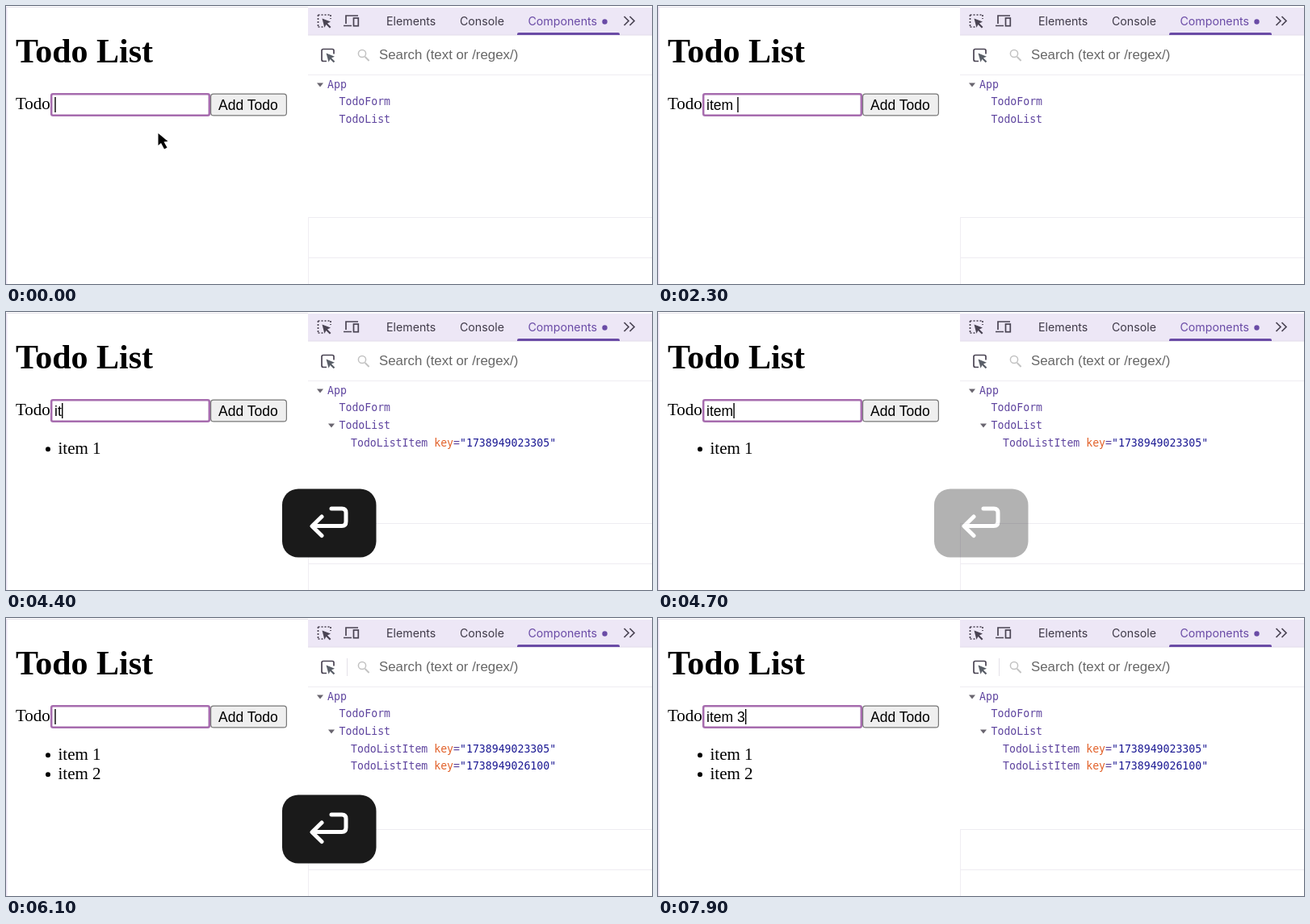
An HTML page for the animation above (8000 ms loop, 800x345 px).

```html
<!DOCTYPE html>
<html lang="en">
<head>
<meta charset="utf-8">
<title>Todo List</title>
<style>
  html, body { margin: 0; width: 100%; height: 100%; overflow: hidden; background: #fff; }
  svg { display: block; width: 100%; height: 100%; }
  text { white-space: pre; }
  .serif { font-family: "Liberation Serif", Times, serif; font-size: 21px; }
  .serif.title { font-size: 42px; font-weight: bold; }
  .field { font-family: "Liberation Sans", Arial, sans-serif; font-size: 17.5px; }
  .search { font-family: "Liberation Sans", Arial, sans-serif; font-size: 16.85px; fill: #676767; }
  .tab { font-family: Inter, sans-serif; font-size: 14.2px; fill: #3f3a48; }
  .tab.active { fill: #6a4ba6; }
  .tree { font-family: "DejaVu Sans Mono", monospace; font-size: 13.2px; fill: #5f459f; }
  .attr { fill: #e2622b; }
  .value { fill: #1c1a94; }
  .line { fill: none; stroke: #4a4453; stroke-width: 1.7; }
</style>
</head>
<body>
<svg viewBox="0 0 800 345">
  <defs>
    <path id="pointer" d="M0 0v15l3.5-3 4 7.5 3.5-1.8-4-7.3 5-.4z"/>
    <path id="triangle" d="M0 0h8l-4 5z" fill="#69656f"/>
  </defs>

  <!-- Page -->
  <rect width="800" height="345" fill="#fff"/>
  <rect y="1" width="374" height="1" fill="#e6e3ea"/>
  <rect y="1" width="1.5" height="344" fill="#ebe4f3"/>
  <text class="serif title" x="12" y="69.5">Todo List</text>
  <text class="serif" x="12" y="128">Todo</text>
  <rect x="56.2" y="109.2" width="195.6" height="26.6" rx="2" fill="#fff" stroke="#a66cae" stroke-width="2.5"/>
  <text id="typed" class="field" x="60" y="128.7"></text>
  <rect id="caret" y="113" width="1.4" height="19" fill="#000"/>
  <rect x="253.6" y="109.1" width="93.8" height="26.8" rx="3.5" fill="#efefef" stroke="#777" stroke-width="1.2"/>
  <text class="field" x="263" y="128.7">Add Todo</text>
  <g id="items"></g>

  <!-- Developer tools -->
  <rect x="374" y="2" width="426" height="34" fill="#ede7f6"/>
  <path d="M374 36h426" stroke="#e1dbe9"/>
  <path d="M374 85.5h426M374 262.5h426M374 312.5h426" stroke="#eeecf1"/>
  <path d="M374.5 262v83" stroke="#f0edf3"/>
  <path class="line" d="M386.5 11h16M386.5 11v16M402 11v5M386.5 26h6" stroke-dasharray="2 2"/>
  <path d="M391.5 15.5l10.5 4-4 2 4.5 4.5-1.6 1.6-4.5-4.5-2 3.7z" fill="#4a4453"/>
  <g class="line">
    <path d="M421 22v-10h15M418 24.5h10"/>
    <rect x="430.5" y="15" width="5.8" height="9.7"/>
  </g>
  <text class="tab" x="471" y="24">Elements</text>
  <text class="tab" x="562" y="24">Console</text>
  <text class="tab active" x="646.5" y="24">Components</text>
  <circle cx="741.5" cy="19.5" r="3.2" fill="#6a4ba6"/>
  <path class="line" d="M765.5 13l5.5 5.5-5.5 5.5M772.5 13l5.5 5.5-5.5 5.5"/>
  <path d="M633 36v-1q0-2 2-2h123q2 0 2 2v1z" fill="#6a4ba6"/>

  <path class="line" d="M397 68.5h-4q-2 0-2-2v-11q0-2 2-2h11q2 0 2 2v4" stroke-width="1.4"/>
  <path d="M396.5 58.5l10.5 4.2-4 1.8 4.3 4.2-1.6 1.6-4.3-4.2-1.8 3.6z" fill="#5a5f68"/>
  <path id="separator" d="M422.5 50v22" stroke="#e4e1e8"/>
  <path d="M444.6 63l5 5" stroke="#c2c2c2" stroke-width="1.8"/>
  <circle cx="441" cy="59" r="4.6" fill="none" stroke="#c2c2c2" stroke-width="1.5"/>
  <text class="search" x="462" y="66.3">Search (text or /regex/)</text>
  <use href="#triangle" x="385" y="95.5"/>
  <text class="tree" x="398" y="102">App</text>
  <text class="tree" x="412.5" y="123.4">TodoForm</text>
  <use id="expander" href="#triangle" x="399" y="138.5"/>
  <text class="tree" x="412.5" y="145">TodoList</text>
  <g id="nodes"></g>

  <!-- Pressed key -->
  <g id="enter">
    <rect x="342" y="219.5" width="116.5" height="85" rx="20" fill="#1a1a1a"/>
    <path d="M403 244h13q5 0 5 5v11q0 5.5-5 5.5h-36M391 254l-12 11.7 12 11.8"
      fill="none" stroke="#fff" stroke-width="5" stroke-linecap="round" stroke-linejoin="round"/>
  </g>

  <!-- Mouse -->
  <use id="arrow" href="#pointer" stroke="#fff" stroke-width="2.2" paint-order="stroke"/>
  <g id="beam" fill="none" stroke-linecap="round">
    <path id="beamShape" d="M-4-9q4 0 4 3.5v11q0 3.5-4 3.5M4-9q-4 0-4 3.5v11q0 3.5 4 3.5M-2.5 1h5" stroke="#fff" stroke-width="3.4"/>
    <use href="#beamShape" style="display:none"/>
    <path d="M-4-9q4 0 4 3.5v11q0 3.5-4 3.5M4-9q-4 0-4 3.5v11q0 3.5 4 3.5M-2.5 1h5" stroke="#111" stroke-width="1.5"/>
  </g>
</svg>
<script>
const LOOP = 8000;
const $ = id => document.getElementById(id);
const clamp = x => Math.max(0, Math.min(1, x));
const show = (el, on) => { el.style.display = on ? "" : "none"; };

// Each entry: moments at which its characters appear, and when it is submitted.
const entries = [
  { text: "item 1", keys: [1800, 1900, 2000, 2200, 2300, 2400], enter: 3200, fade: 4500, id: "1738949023305" },
  { text: "item 2", keys: [4300, 4400, 4500, 4600, 4800, 4900], enter: 6000, fade: 7200, id: "1738949026100" },
  { text: "item 3", keys: [6700, 6800, 6900, 7100, 7300, 7500], enter: LOOP }
];
const caretOff = [[500, 1000], [1500, 1800], [2900, 3200], [3800, 4300], [5400, 5800], [6500, 6700]];

const submitted = entries.filter(e => e.id);
submitted.forEach((e, i) => {
  $("items").innerHTML += `<g><circle cx="52" cy="${170.3 + 24 * i}" r="3"/>
    <text class="serif" x="64.5" y="${176 + 24 * i}">${e.text}</text></g>`;
  $("nodes").innerHTML += `<text class="tree" x="427" y="${166.5 + 21.6 * i}">TodoListItem <tspan
    class="attr">key</tspan>=<tspan class="value">"${e.id}"</tspan></text>`;
});

function drawInput(t) {
  const entry = entries.find(e => t < e.enter);
  const count = entry.keys.filter(k => t >= k).length;
  const typed = $("typed");
  typed.textContent = entry.text.slice(0, count);
  $("caret").setAttribute("x", 60.3 + (count ? typed.getComputedTextLength() : 0));
  show($("caret"), !caretOff.some(([from, to]) => t >= from && t < to));
}

function drawMouse(t) {
  const p = clamp((t - 100) / 900);
  const ease = p * p * (3 - 2 * p);
  const x = 188.5 - 17 * ease, y = 158 - 23.5 * ease;
  const overField = y < 137, visible = t < 1800;
  for (const id of ["arrow", "beam"]) $(id).setAttribute("transform", `translate(${x} ${y})`);
  show($("arrow"), visible && !overField);
  show($("beam"), visible && overField);
}

function draw(t) {
  drawInput(t);
  drawMouse(t);
  submitted.forEach((e, i) => {
    show($("items").children[i], t >= e.enter);
    show($("nodes").children[i], t >= e.enter);
  });
  show($("expander"), t >= submitted[0].enter);
  show($("separator"), t >= 5800);
  const pressed = submitted.filter(e => t >= e.enter).pop();
  $("enter").setAttribute("opacity", pressed ? 1 - clamp((t - pressed.fade) / 300) : 0);
}

function frame() {
  draw(performance.now() % LOOP);
  requestAnimationFrame(frame);
}
frame();
</script>
</body>
</html>
```
